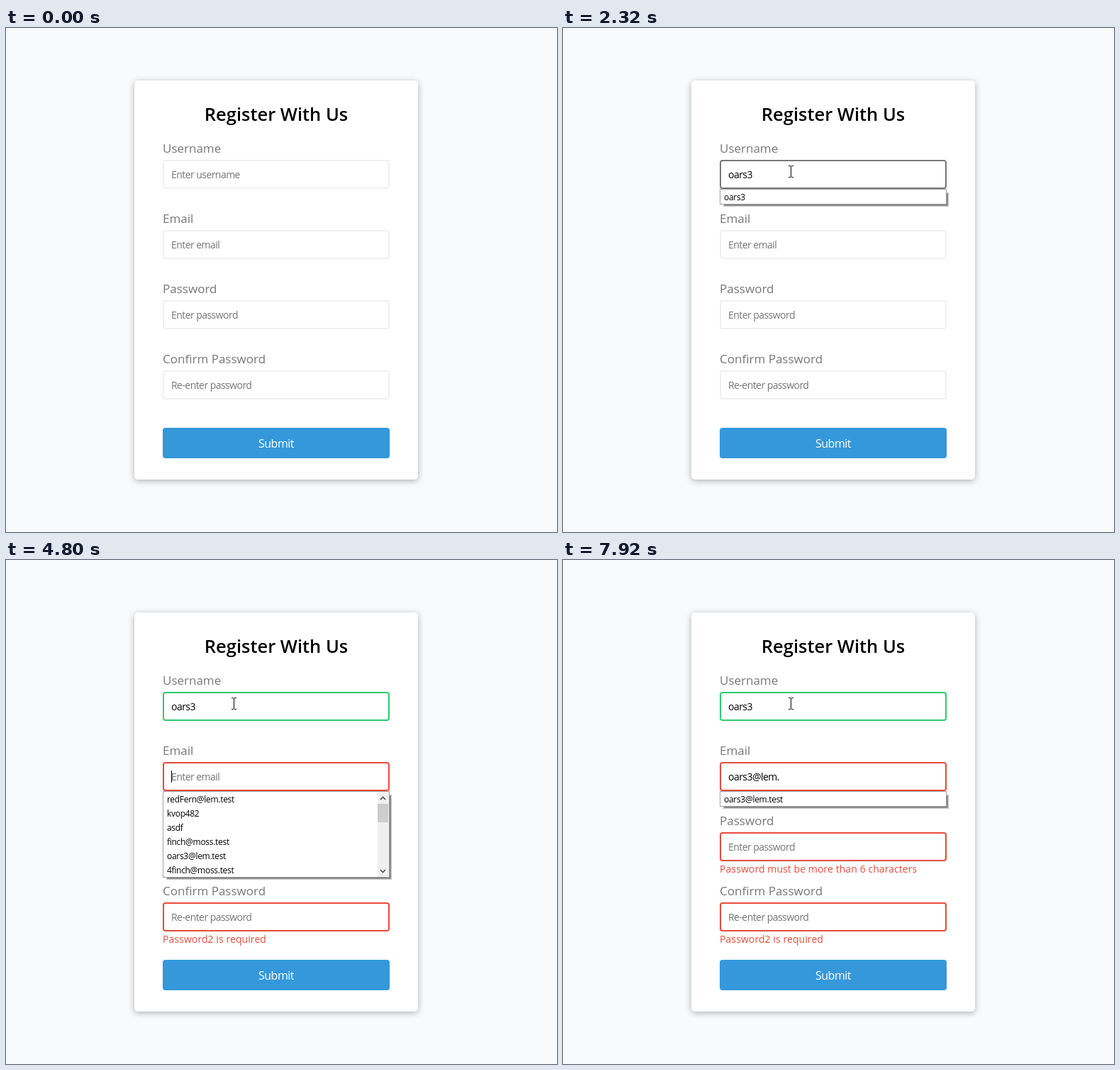
An HTML page with a canvas that plays this animation: 777 px wide and 711 px high, repeating every 8 s.

```html
<!DOCTYPE html>
<html lang="en">
<head>
<meta charset="utf-8">
<title>Register form</title>
<style>
  html, body { margin: 0; width: 100%; height: 100%; overflow: hidden; background: #f9fafc; }
  canvas { display: block; }
</style>
</head>
<body>
<canvas id="stage" width="777" height="711"></canvas>
<script>
const ctx = document.getElementById('stage').getContext('2d');
const LOOP = 8000;
const LEFT = 221, WIDTH = 320, FIELD_H = 41;
const GREEN = '#2ecc71', RED = '#e74c3c', GREY = '#777', PALE = '#f0f0f0';

const USER = 'oars3';
const MAIL = USER + '@lem.test';
const USER_HINTS = [USER, 'oars31', 'oarsman'];
const MAIL_HINTS = ['redFern@lem.test', 'kvop482', 'asdf', 'finch@moss.test', MAIL, '4finch@moss.test'];

const FIELDS = [
  { y: 186, label: 'Username', hint: 'Enter username' },
  { y: 285, label: 'Email', hint: 'Enter email', error: 'Email is not valid' },
  { y: 384, label: 'Password', hint: 'Enter password', error: 'Password must be more than 6 characters' },
  { y: 483, label: 'Confirm Password', hint: 'Re-enter password', error: 'Password2 is required' }
];

const START = { user: '', mail: '', focus: -1, caret: false, list: null, checked: false, pointer: null };

// Each step overrides part of the state from its time on.
const STEPS = [
  [130, { pointer: [372, 349, 'arrow'] }],
  [285, { pointer: [350, 296, 'beam'] }],
  [440, { pointer: [326, 218, 'beam'] }],
  [595, { pointer: [321, 204, 'beam'], focus: 0, caret: true }],
  [750, { pointer: [321, 202, 'beam'] }],
  [1070, { caret: false }],
  [1530, { caret: true, user: USER.slice(0, 1), list: USER_HINTS }],
  [1690, { user: USER.slice(0, 3) }],
  [1850, { user: USER }],
  [2000, { list: USER_HINTS.slice(0, 2) }],
  [2160, { list: [USER] }],
  [2320, { caret: false }],
  [2780, { caret: true }],
  [3240, { caret: false }],
  [3710, { caret: true }],
  [4020, { checked: true, list: null }],
  [4330, { caret: false }],
  [4650, { focus: 1, caret: true }],
  [4800, { list: MAIL_HINTS }],
  [5270, { caret: false }],
  [5580, { caret: true, mail: MAIL.slice(0, 2), list: [MAIL, ...USER_HINTS.slice(1)] }],
  [5740, { mail: MAIL.slice(0, 4), list: [MAIL, USER_HINTS[1]] }],
  [6050, { mail: USER }],
  [6190, { list: [MAIL] }],
  [6820, { caret: false }],
  [7150, { caret: true, mail: MAIL.slice(0, 6) }],
  [7300, { mail: MAIL.slice(0, 7) }],
  [7460, { mail: MAIL.slice(0, 8) }],
  [7610, { mail: MAIL.slice(0, 9) }],
  [7770, { mail: MAIL.slice(0, 10) }],
  [7920, { caret: false }]
];

function stateAt(time) {
  return Object.assign({}, START, ...STEPS.filter(([t]) => t <= time).map(([, patch]) => patch));
}

function text(str, x, y, size, color, { spacing = 0, weight = 400, align = 'left' } = {}) {
  ctx.font = `${weight} ${size}px "Open Sans", sans-serif`;
  ctx.letterSpacing = spacing + 'px';
  ctx.textAlign = align;
  ctx.fillStyle = color;
  ctx.fillText(str, x, y);
  return ctx.measureText(str).width;
}

function rect(x, y, w, h, color) {
  ctx.fillStyle = color;
  ctx.fillRect(x, y, w, h);
}

function roundBox(x, y, w, h, r, color) {
  ctx.beginPath();
  ctx.roundRect(x, y, w, h, r);
  ctx.fillStyle = color;
  ctx.fill();
}

function line(color, width, ...points) {
  ctx.beginPath();
  points.forEach(([x, y]) => ctx.lineTo(x, y));
  ctx.strokeStyle = color;
  ctx.lineWidth = width;
  ctx.stroke();
}

function drawCard() {
  ctx.save();
  ctx.shadowColor = 'rgba(0,0,0,0.3)';
  ctx.shadowBlur = 10;
  ctx.shadowOffsetY = 2;
  roundBox(181, 74, 400, 563, 5, '#fff');
  ctx.restore();
  text('Register With Us', 381, 131, 25.5, '#000', { weight: 600, align: 'center' });
  roundBox(LEFT, 564, WIDTH, 43, 4, '#3498db');
  text('Submit', 381, 592, 16, '#fff', { spacing: -0.5, align: 'center' });
}

function drawField(field, index, state) {
  const { y, label, hint, error } = field;
  const value = [state.user, state.mail][index] || '';
  const focused = state.focus === index;
  const border = state.checked ? (error ? RED : GREEN) : focused ? GREY : PALE;

  text(label, LEFT, y - 10, 17, GREY);
  roundBox(LEFT, y, WIDTH, FIELD_H, 4, border);
  roundBox(LEFT + 2, y + 2, WIDTH - 4, FIELD_H - 4, 2, '#fff');
  const width = text(value || hint, LEFT + 12, y + 26, 14, value ? '#000' : '#757575', { spacing: -0.55 });
  if (focused && state.caret) {
    rect(Math.round(LEFT + 12 + (value ? width : 0)), y + 12, 1, 17, '#000');
  }
  if (state.checked && error) text(error, LEFT, y + 57, 14, RED, { spacing: 0.08 });
}

function drawScrollbar(y, h) {
  rect(524, y + 1, 16, h - 2, '#f0f0f0');
  rect(524, y + 18, 15, 26, '#cdcdcd');
  line('#505050', 1.6, [528, y + 12], [531.5, y + 8.5], [535, y + 12]);
  line('#505050', 1.6, [528, y + h - 11], [531.5, y + h - 7.5], [535, y + h - 11]);
}

function drawList(items, y) {
  const h = items.length * 20 + 2;
  for (let i = 1; i <= 3; i++) {
    rect(LEFT + 8 - i, y + 8 - i, WIDTH - 8 + 2 * i, h - 8 + 2 * i, 'rgba(0,0,0,0.22)');
  }
  rect(LEFT, y, WIDTH, h, '#a0a0a0');
  rect(LEFT + 1, y + 1, WIDTH - 2, h - 2, '#fff');
  items.forEach((item, i) => text(item, LEFT + 6, y + 16 + i * 20, 12, '#000', { spacing: -0.3 }));
  if (items.length > 5) drawScrollbar(y, h);
}

function drawPointer([x, y, kind]) {
  if (kind === 'beam') {
    rect(x, y - 7, 1, 15, '#000');
    for (const edge of [y - 8, y + 8]) {
      rect(x - 3, edge, 3, 1, '#000');
      rect(x + 1, edge, 3, 1, '#000');
    }
    return;
  }
  ctx.beginPath();
  [[0, 0], [0, 16], [4, 12.5], [6.5, 18], [9, 17], [6.5, 11.5], [11.5, 11.5]]
    .forEach(([dx, dy]) => ctx.lineTo(x + dx, y + dy));
  ctx.closePath();
  ctx.fillStyle = '#fff';
  ctx.fill();
  ctx.strokeStyle = '#000';
  ctx.lineWidth = 1;
  ctx.stroke();
}

function draw(now) {
  const state = stateAt(now % LOOP);
  rect(0, 0, 777, 711, '#f9fafc');
  drawCard();
  FIELDS.forEach((field, i) => drawField(field, i, state));
  if (state.list) drawList(state.list, FIELDS[state.focus].y + FIELD_H);
  if (state.pointer) drawPointer(state.pointer);
}

const begin = performance.now();
function tick() {
  draw(performance.now() - begin);
  requestAnimationFrame(tick);
}
tick();
</script>
</body>
</html>
```
